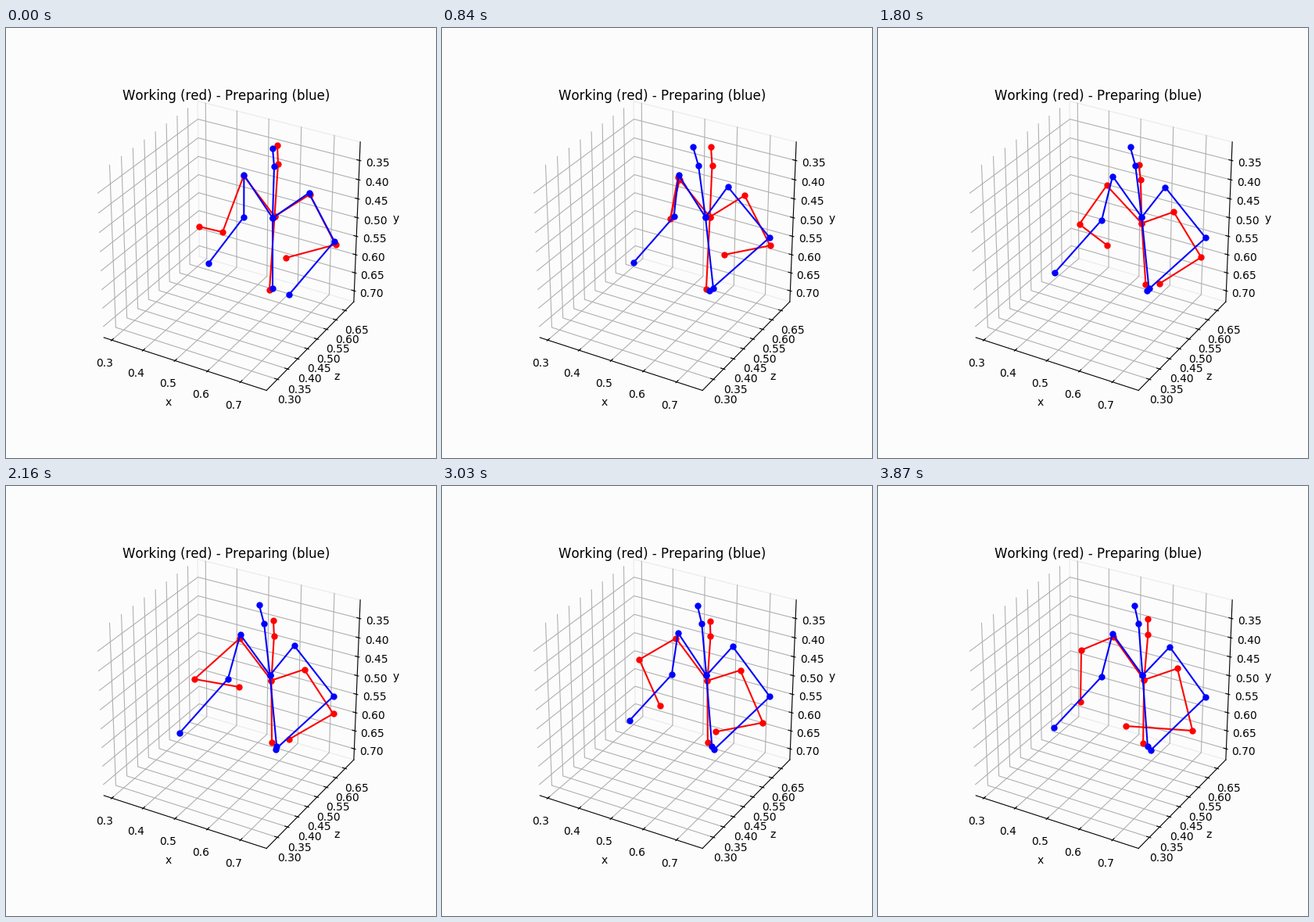
A matplotlib script for the animation above (3900 ms loop, 550 by 550 pixels).

```python
import numpy as np
import matplotlib.pyplot as plt
from matplotlib.animation import FuncAnimation

SIZE, DPI = 550, 100
FRAMES, STEP = 130, 30
BG, GRID, PANE_EDGE = "#fcfcfc", "#b0b0b0", "#ededed"

plt.rcParams["font.family"] = "DejaVu Sans"
plt.rcParams["text.kerning_factor"] = 6
fig = plt.figure(figsize=(SIZE / DPI, SIZE / DPI), dpi=DPI, facecolor=BG)
ax = fig.add_axes([0, 0, 1, 1])
ax.set(xlim=(0, SIZE), ylim=(SIZE, 0))
ax.axis("off")

# Camera at elevation 30, azimuth -60, looking at the centre of a unit box.
ELEV, AZIM, DIST = np.radians(30), np.radians(-60), 10
NORMAL = np.array([np.cos(AZIM) * np.cos(ELEV), np.sin(AZIM) * np.cos(ELEV), np.sin(ELEV)])
RIGHT = np.array([-np.sin(AZIM), np.cos(AZIM), 0])
UP = np.cross(NORMAL, RIGHT)


def project(p):
    """Box coordinates (0..1 on each axis) to stage pixels."""
    q = (np.asarray(p, float) - 0.5) * 25 / 24
    depth = DIST - q @ NORMAL
    u, v = q @ RIGHT / depth, q @ UP / depth
    left, bottom, width, height = np.array([0.125, 0.11, 0.775, 0.77]) * SIZE
    return (left + width * (u + 0.095) / 0.185,
            SIZE - bottom - height * (v + 0.095) / 0.185)


def path(points, color, width, z):
    xs, ys = zip(*(project(p) for p in points))
    ax.plot(xs, ys, color=color, lw=width, zorder=z)


# Per axis: label, value at 0, value at 1, ticks, decimals,
# coordinates of the axis edge, tick direction and sign.
# None stands for the position along the axis.
AXES = [
    ("x", 0.2746, 0.7772, np.arange(0.3, 0.71, 0.1), 1, (None, 0, 0), 1, -1),
    ("z", 0.2475, 0.6977, np.arange(0.30, 0.66, 0.05), 2, (1, None, 0), 0, 1),
    ("y", 0.7306, 0.3027, np.arange(0.35, 0.71, 0.05), 2, (1, 1, None), 0, 1),
]
GRID_PATHS = [
    [(None, 0, 0), (None, 1, 0), (None, 1, 1)],
    [(1, None, 0), (0, None, 0), (0, None, 1)],
    [(0, 0, None), (0, 1, None), (1, 1, None)],
]


def fill(p, value):
    return np.array([value if c is None else c for c in p], float)


def outward(p, axis, amount):
    shift = np.where(p < 0.5, -amount, amount)
    shift[axis] = 0
    return p + shift


path([(0, 1, 0), (0, 1, 1), (1, 1, 1), (1, 1, 0), (0, 1, 0)], PANE_EDGE, 1, 1)

for i, (name, lo, hi, ticks, digits, edge, tdir, sign) in enumerate(AXES):
    path([fill(edge, 0), fill(edge, 1)], "k", 0.8, 3)
    for tick in ticks:
        s = (tick - lo) / (hi - lo)
        path([fill(p, s) for p in GRID_PATHS[i]], GRID, 0.8, 2)
        base = fill(edge, s)
        along = np.eye(3)[tdir] * sign
        path([base + 0.008 * along, base - 0.016 * along], "k", 0.8, 3)
        ax.text(*project(outward(base, i, 0.0722)), f"{tick:.{digits}f}",
                size=10, ha="center", va="top")
    ax.text(*project(outward(fill(edge, 0.5), i, 0.1569)), name,
            size=10, ha="center", va="center")

ax.text(281.9, 91.6, "Working (red) - Preparing (blue)", size=12,
        ha="center", va="baseline")

POSES = (0, 28, 48, 72, 88, 115, 129)
T = np.arange(FRAMES)


def ease(*values, at=POSES):
    """Smoothstep from key to key, sampled at every frame."""
    steps = np.arange(len(at))
    pos = np.interp(T, at, steps)
    whole = np.floor(pos)
    f = pos - whole
    return np.interp(whole + f * f * (3 - 2 * f), steps, values)


def pt(x, y):
    return np.stack(np.broadcast_arrays(x, y), axis=-1)


def chain(spine, arms):
    """Frames x points x 2, with a gap between the two polylines."""
    gap = np.full((FRAMES, 2), np.nan)
    return np.stack([*spine, gap, *arms], axis=1)


def working():
    """Trunk follows lean and dip; the right elbow sags late; hands are free."""
    lean = ease(0, 3, 22, 5, 8, 0, 2)
    dip = ease(0, 2, 28, 22, 20, 26, 20)
    sag = ease(0, 1, 1, at=(88, 115, 129))
    head = pt(347 - lean, 150 + dip)
    neck = pt(348 - 0.8 * lean - 0.05 * dip, 174 + 0.8 * dip)
    chest = pt(343.5 - 0.2 * lean - 0.14 * dip, 241 + 0.35 * dip)
    hip = pt(337 + 0.25 * lean + 0.08 * dip, 335 - 0.3 * dip)
    l_shoulder = pt(304 - 0.7 * lean - 0.08 * dip, 189 + 0.7 * lean + 0.12 * dip)
    r_shoulder = pt(388.5 - 0.3 * lean - 0.25 * dip, 213 + 1.05 * dip - 0.3 * lean)
    r_elbow = pt(421.5 - 0.6 * lean - 18 * sag, 277 + 0.65 * dip + 23 * sag)
    r_hand = pt(ease(358, 361, 358, 362, 343, 357, 317),
                ease(294, 290, 330, 324, 296, 335, 307))
    l_elbow = pt(ease(277, 292, 274, 241, 268, 235, 260),
                 ease(261, 244, 255, 247, 195, 252, 210))
    l_hand = pt(ease(247, 304, 287, 298, 299, 256, 259),
                ease(254, 194, 298, 257, 243, 324, 276))
    return chain((head, neck, chest, hip),
                 (l_hand, l_elbow, l_shoulder, chest, r_shoulder, r_elbow, r_hand))


def preparing():
    """One lean settles the body; the left arm trails its hand."""
    lean = ease(20, 0, 7, at=(0, 28, 129))
    head = pt(321 + lean, 152 + 0.1 * lean)
    neck = pt(328 + 0.75 * lean, 176 + 0.05 * lean)
    chest = pt(337 + 0.2 * lean, 242 + 0.05 * lean)
    hip = pt(347 - 0.3 * lean, 333)
    r_shoulder = pt(365.5 + 1.1 * lean, 203 + 0.4 * lean)
    r_elbow = pt(419 + 0.05 * lean, 268 + 0.25 * lean)
    r_hand = pt(342 + lean, 336 + 0.25 * lean)
    l_hand = pt(ease(259, 245, 230, 222, 246, 233, 225),
                ease(301, 300, 310, 316, 300, 300, 309))
    pull = l_hand - (233, 305)
    l_elbow = (290, 243) + pull * (0.55, 0.33)
    l_shoulder = (301, 188.5) + 0.13 * pull
    return chain((head, neck, chest, hip),
                 (l_hand, l_elbow, l_shoulder, chest, r_shoulder, r_elbow, r_hand))


bodies = []
for z, (color, poses) in enumerate((("red", working()), ("blue", preparing())), 5):
    line, = ax.plot([], [], "o-", color=color, lw=1.5, ms=5, zorder=z)
    bodies.append((line, poses))


def update(i):
    for line, poses in bodies:
        line.set_data(*poses[i].T)
    return [line for line, _ in bodies]


anim = FuncAnimation(fig, update, frames=FRAMES, interval=STEP, repeat=True,
                     repeat_delay=0, blit=False)
plt.show()
```
